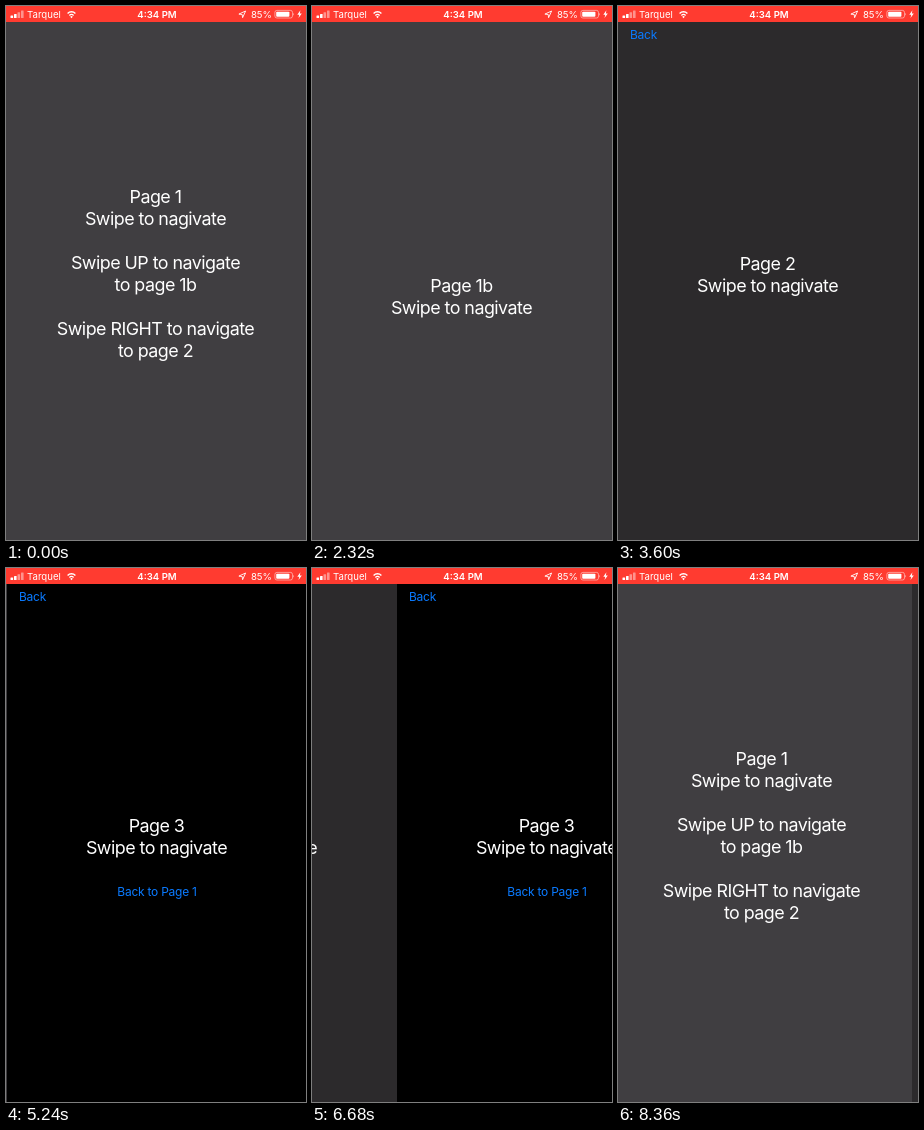
These frames come from a looping animation (300 px wide and 534 px high, 8.4 s). An HTML page:

```html
<!DOCTYPE html>
<html lang="en">
<head>
<meta charset="utf-8">
<title>Swipe navigation</title>
<style>
  html, body { margin: 0; width: 100%; height: 100%; overflow: hidden; background: #000; }
  body { position: relative; font-family: Inter, Roboto, sans-serif; font-optical-sizing: none; color: #fff; }
  .page { position: absolute; left: 0; top: 0; width: 300px; height: 534px; visibility: hidden; }
  .page p { position: absolute; left: -.5px; width: 100%; margin: 0; text-align: center; white-space: pre;
            font-size: 17.9px; line-height: 22px; letter-spacing: -.03em; }
  .link { position: absolute; font-size: 12px; line-height: 16px; letter-spacing: -.02em; color: #0a7aff; white-space: nowrap; }
  .back { left: 12px; top: 20.5px; }
  .home { left: 0; width: 100%; top: 316px; text-align: center; }
  #one, #oneB { background: #403e41; }
  #two { background: #2c2a2c; }
  #three { background: #000; }
  #one p { top: 180px; }
  #oneB p, #two p, #three p { top: 247px; }
  #status { position: absolute; left: 0; top: 0; width: 300px; height: 16px; background: #ff3b30; }
  #status span { position: absolute; top: 0; font-size: 9.6px; line-height: 17px; white-space: nowrap; }
  #status svg { position: absolute; left: 0; top: 0; }
  #clock { left: 0; width: 302px; text-align: center; font-weight: 600; }
</style>
</head>
<body>
<div class="page" id="one"><p>Page 1
Swipe to nagivate

Swipe UP to navigate
to page 1b

Swipe RIGHT to navigate
to page 2</p></div>
<div class="page" id="oneB"><p>Page 1b
Swipe to nagivate</p></div>
<div class="page" id="two"><span class="link back">Back</span><p>Page 2
Swipe to nagivate</p></div>
<div class="page" id="three"><span class="link back">Back</span><p>Page 3
Swipe to nagivate</p><span class="link home">Back to Page 1</span></div>

<div id="status">
  <span style="left:21px">Tarquel</span>
  <span id="clock">4:34 PM</span>
  <span style="right:34px">85%</span>
  <svg width="300" height="16" fill="#fff">
    <rect x="4.5" y="9.5" width="2.6" height="2.5" rx=".5"/>
    <rect x="8" y="8" width="2.6" height="4" rx=".5"/>
    <rect x="11.5" y="6.2" width="2.6" height="5.8" rx=".5" opacity=".45"/>
    <rect x="15" y="4.4" width="2.6" height="7.6" rx=".5" opacity=".45"/>
    <g fill="none" stroke="#fff" stroke-width="1.4">
      <path d="M61.6 7.4a5.4 5.4 0 0 1 7.8 0"/>
      <path d="M63.4 9.4a3 3 0 0 1 4.2 0"/>
    </g>
    <path d="M64.2 10.8a1.8 1.8 0 0 1 2.6 0L65.5 12.2z"/>
    <path d="M239.6 5 236.6 11.7 236.2 8.5 232.9 8.1z" fill="none" stroke="#fff" stroke-width=".9" stroke-linejoin="round"/>
    <rect x="268.9" y="4.4" width="17.6" height="7.6" rx="2" fill="none" stroke="#fff" stroke-width=".8" opacity=".6"/>
    <rect x="270.2" y="5.7" width="13.2" height="5" rx=".9"/>
    <path d="M287.3 6.9a1.5 1.5 0 0 1 0 2.6z" opacity=".6"/>
    <path d="M294.4 4.3 291.3 8.7H293.3L292.5 12 295.8 7.6H293.8z"/>
  </svg>
</div>

<script>
const LOOP = 8400, FRAME = 40, WIDTH = 300, HEIGHT = 534;
const LEFT = [-WIDTH, 0], RIGHT = [WIDTH, 0], UP = [0, -HEIGHT], DOWN = [0, HEIGHT];

// Solves a CSS-style cubic bezier by bisection.
const bezier = (x1, y1, x2, y2) => x => {
  const at = (s, a, b) => 3 * s * (1 - s) ** 2 * a + 3 * s * s * (1 - s) * b + s ** 3;
  let low = 0, high = 1;
  for (let i = 0; i < 24; i++) {
    const mid = (low + high) / 2;
    if (at(mid, x1, x2) < x) low = mid; else high = mid;
  }
  return at(low, y1, y2);
};
const flick = bezier(.3, .06, .15, 1);
const easeInOut = bezier(.42, 0, .58, 1);

const swipe = (at, steps, from, to, way) =>
  ({ start: at - FRAME, length: steps * FRAME, ease: flick, from, to, way });
const tap = (at, from, to) =>
  ({ start: at - 14, length: 327, ease: easeInOut, from, to, way: RIGHT });

const moves = [
  swipe(1320, 12, "one", "oneB", UP),
  swipe(2320, 13, "oneB", "one", DOWN),
  swipe(3200, 11, "one", "two", LEFT),
  swipe(4240, 11, "two", "three", LEFT),
  tap(5240, "three", "one"),
  swipe(5960, 10, "one", "two", LEFT),
  swipe(6560, 10, "two", "three", LEFT),
  tap(7440, "three", "two"),
  tap(8080, "two", "one"),
];
const pages = [...document.querySelectorAll(".page")];

function place(id, [x, y], part) {
  const { style } = document.getElementById(id);
  style.visibility = "visible";
  style.transform = `translate(${Math.round(x * part)}px, ${Math.round(y * part)}px)`;
}

function render(time) {
  pages.forEach(page => page.style.visibility = "hidden");
  const move = moves.findLast(m => m.start < time);
  if (!move) return place("one", LEFT, 0);
  const x = (time - move.start) / move.length;
  const done = x >= 1 ? 1 : move.ease(x);
  if (done < 1) place(move.from, move.way, done);
  place(move.to, move.way, done - 1);
}

const began = performance.now();
function tick() {
  const time = (performance.now() - began) % LOOP;
  render(Math.floor(time / FRAME) * FRAME);
  requestAnimationFrame(tick);
}
tick();
</script>
</body>
</html>
```
